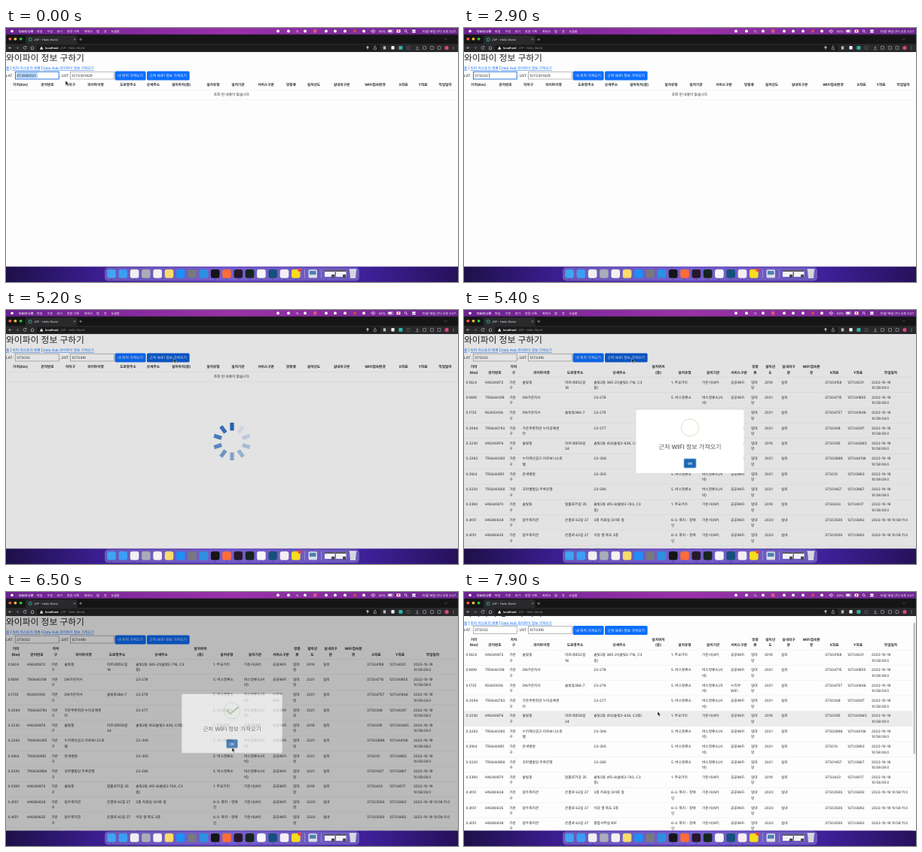
An HTML page for the animation above (8 s loop, 600 by 338 pixels).

```html
<!DOCTYPE html>
<html lang="ko">
<head>
<meta charset="utf-8">
<title>와이파이 정보 구하기</title>
<style>
html, body { margin: 0; width: 100%; height: 100%; overflow: hidden; background: #2a1460; }
svg { display: block; width: 100vw; height: 100vh; }
text { font-family: Inter, "Noto Sans CJK KR", "Noto Sans CJK", sans-serif; text-rendering: geometricPrecision; white-space: pre; }
</style>
</head>
<body>
<svg id="stage" viewBox="0 0 600 338" xmlns="http://www.w3.org/2000/svg"></svg>
<script>
const LOOP = 8000, STEP = 100;
const TOP = 32, BOTTOM = 317.6, ROW_H = 20.35, ROW_TOP = 89.6;
const INK = '#212529', BLUE = '#0d6efd';

// --- markup helpers ---
const rect = (x, y, w, h, fill, extra = '') =>
  `<rect x="${x}" y="${y}" width="${w}" height="${h}" fill="${fill}" ${extra}/>`;
const dot = (x, y, r, fill, extra = '') => `<circle cx="${x}" cy="${y}" r="${r}" fill="${fill}" ${extra}/>`;
const path = (d, stroke, w = 0.7, extra = '') =>
  `<path d="${d}" fill="none" stroke="${stroke}" stroke-width="${w}" ${extra}/>`;
const label = (x, y, s, size = 4.7, fill = INK, extra = '') =>
  `<text x="${x}" y="${y + size * 0.36}" font-size="${size}px" fill="${fill}" ${extra}>${s}</text>`;
const lines = (x, y, s, extra) =>
  s.split('|').map((part, i) => label(x, y + i * 7.5, part, 4.7, INK, extra)).join('');
const MID = 'text-anchor="middle"', BOLD = 'font-weight="600"';
const group = (id, body, extra = '') => `<g id="${id}" ${extra}>${body}</g>`;

// --- menu bar and browser frame ---
function menuBar() {
  const items = [[41, '파일'], [54.5, '수정'], [67.5, '보기'], [81, '방문 기록'], [104, '북마크'], [120, '탭'], [130, '창'], [139.5, '도움말']];
  const w = '#fff';
  let s = dot(8, 4.2, 1.8, w) + label(17, 4.2, '다도리 나루', 4, w, 'font-weight="700"');
  s += items.map(([x, t]) => label(x, 4.2, t, 4, w)).join('');
  s += [361, 375, 397, 425, 437, 450, 475].map(x => dot(x, 4.2, 1.9, w)).join('');
  s += label(384.5, 4.2, '7L', 4, w) + rect(408, 2, 4.4, 4.4, '#e0567c') + dot(463, 4.2, 1.9, '#e2484d');
  s += path('M485 3.4h1.2l1.6-1.4v4.4l-1.6-1.4H485zM489 2.6q1.4 1.6 0 3.2', w, 0.6);
  s += label(495, 4.2, '80%', 4, w);
  s += rect(507, 2.5, 6.6, 3.4, 'none', `rx=".8" stroke="${w}" stroke-width=".5"`) + rect(507.6, 3.1, 4.4, 2.2, w);
  s += rect(518.5, 2.3, 5, 3.8, w) + dot(521, 4.2, 1.1, '#d83a55');
  s += dot(530.5, 3.8, 1.4, 'none', `stroke="${w}" stroke-width=".6"`) + path('M531.5 4.9l1.5 1.5', w);
  s += rect(539, 2.3, 4.8, 1.6, w, 'rx=".8"') + rect(539, 4.6, 4.8, 1.6, w, 'rx=".8"');
  s += label(597, 4.2, '10월 19일 (수) 오후 3:27', 4.2, w, 'text-anchor="end"');
  return rect(0, 0, 600, 9, 'url(#menu)') + group('menuItems', s);
}

function browserFrame() {
  const g = '#b9b9bc';
  let s = rect(0, 8.6, 600, 13, '#151516') + rect(0, 21, 600, 11.2, '#29292b');
  s += dot(5.3, 14.6, 1.9, '#ff5f57') + dot(12.4, 14.6, 1.9, '#febc2e') + dot(19.6, 14.6, 1.9, '#28c840');
  s += rect(26, 10, 68.5, 12, '#29292b', 'rx="2"');
  s += dot(32.2, 15.4, 2, 'none', 'stroke="#35b8a0" stroke-width=".9"');
  s += label(37, 15.4, 'JSP - Hello World', 3.8, '#e4e4e6');
  s += path('M89.8 14l2.4 2.4m0-2.4l-2.4 2.4', g, 0.5) + path('M97.2 15.2h3.8m-1.9-1.9v3.8', g, 0.6);
  s += path('M582 13.8l1.8 1.8 1.8-1.8', '#77777a', 0.6);
  s += rect(41, 22.4, 456, 8.2, '#1a1a1b', 'rx="2"');
  s += `<path d="M44.8 28.4l2.3-4.2 2.3 4.2z" fill="#e8e8ea"/>`;
  s += label(52, 26.4, 'localhost', 4, '#fff', BOLD) + label(72, 26.4, 'JSP - Hello World', 3.9, '#8f8f93');

  let t = path('M7.4 26.4H3.6m1.8-1.8l-1.8 1.8 1.8 1.8', g) + path('M13 26.4h3.8m-1.8-1.8l1.8 1.8-1.8 1.8', '#707074');
  t += path('M26.6 25a2 2 0 1 0 .4 1.8M27 24v1.4h-1.4', g) + path('M32.8 26.2l2.2-2 2.2 2M33.5 26v2.4h3V26', g);
  t += dot(480, 25.6, 1.5, g) + path('M480 26.5v2.2', g, 0.9);
  t += path('M488.2 25.6v3h3.2v-3M489.8 27.2v-3.4m-1.1 1l1.1-1 1.1 1', g, 0.6);
  t += rect(500.8, 24.2, 3.4, 4.2, g, 'rx=".6"') + rect(511.4, 24, 4.2, 4.6, '#f1f1f3', 'rx=".8"');
  t += rect(521.4, 24, 5, 4.8, '#2bb8a8', 'rx=".8"');
  t += rect(532, 24.4, 4, 4, 'none', `rx="1" stroke="#77777a" stroke-width=".6"`);
  t += path('M546 24v3m-1.3-1.2l1.3 1.3 1.3-1.3M543.8 28.6h4.4', g, 0.6);
  t += [555.5, 565.5, 575].map(x => rect(x - 2, 24.4, 4, 4, 'none', `rx=".6" stroke="${g}" stroke-width=".6"`)).join('');
  t += dot(585, 26.4, 2.6, '#d6457f') + [24.8, 26.4, 28].map(y => dot(594, y, 0.5, g)).join('');
  return s + group('tools', t);
}

// --- page content ---
const field = (id, x) =>
  rect(x, 58.2, 57.6, 9.8, '#fff', `id="${id}Box" stroke="#767676" stroke-width=".5"`) +
  rect(x + 1.4, 59.3, 28, 7.6, '#b3d7ff', `id="${id}Sel"`) +
  label(x + 1.6, 63.1, '', 4.7, INK, `id="${id}"`) +
  rect(0, 59.8, 0.5, 6.6, '#111', `id="${id}Caret"`);

const link = (x, s) => label(x, 53.6, s, 4.7, BLUE, 'text-decoration="underline"');
const button = (id, x, w, s) =>
  rect(x, 57.4, w, 12.2, BLUE, `id="${id}" rx="1.7"`) + label(x + w / 2, 63.4, s, 4.8, '#fff', MID);
const rule = y => rect(0, y, 600, 0.35, '#dee2e6');

function pageHead() {
  return label(0, 40.2, '와이파이 정보 구하기', 11.8, INK, 'font-weight="500"') +
    link(0, '홈') + label(5.6, 53.6, '|') + link(8.5, '위치 히스토리 목록') + label(46.9, 53.6, '|') +
    link(49.2, 'Data Hub 와이파이 정보 가져오기') +
    label(0, 63, 'LAT :') + field('lat', 12.5) + label(71, 63, ', LNT :') + field('lnt', 85.6) +
    button('near', 144.6, 41, '내 위치 가져오기') + button('find', 187, 56.6, '근처 WIFI 정보 가져오기');
}

const HEADS = ['거리(Km)', '관리번호', '자치구', '와이파이명', '도로명주소', '상세주소', '설치위치(층)', '설치유형', '설치기관',
  '서비스구분', '망종류', '설치년도', '실내외구분', 'WIFI접속환경', 'X좌표', 'Y좌표', '작업일자'];
const WRAPPED = { 0: '거리|(Km)', 2: '자치|구', 6: '설치위치|(층)', 10: '망종|류', 11: '설치년|도', 12: '실내외구|분', 13: 'WIFI접속환|경' };

function emptyTable() {
  const xs = [19, 55, 85.5, 119, 162, 195.5, 232.5, 275, 308, 345, 378.5, 408.5, 445.5, 490, 527.5, 553.5, 583];
  return HEADS.map((h, i) => label(xs[i], 75.8, h, 4.7, INK, `${MID} font-weight="700"`)).join('') +
    rule(82) + label(300, 88.5, '조회 된 내용이 없습니다.', 4.7, INK, MID) + rule(95);
}

// kind: type, agency, year, indoor, date
const KINDS = {
  s: ['1. 주요거리', '가온시(AP)', '2019', '실외', '2022-10-19|10:58:09.0'],
  b: ['5. 버스정류소', '버스정류소(시|비)', '2021', '실외', '2022-10-19|10:58:08.0'],
  n: ['5. 버스정류소', '버스정류소(국|비)', '2021', '실외', '2022-10-19|10:58:04.0'],
  c: ['6-3. 복지 - 장애|인', '가온시(AP)', '2020', '실내', '2022-10-19 10:58:11.0']
};
// kind; distance; id; name; road; detail; x; y
const ROWS = `s;0.1624;HN340872;솔빛동;미르내로52길|18;솔빛2동 385-21(솔빛2-716, C3|층);37.504158;127.04021
b;0.1699;TRS640318;DN가온지사;;23-278;37.504715;127.041855
n;0.1735;RS400006;DN가온지사;솔빛동386-7;23-279;37.504757;127.041466
b;0.2094;TRS640793;가온푸른회관.누리공예센|터;;23-277;37.50308;127.04397
s;0.2230;HN340876;솔빛동;미르내로58길|24;솔빛2동 412(솔빛2-638, C3층);37.50395;127.043945
b;0.2263;TRS640265;누리재산금고.아르보니스호|텔;;23-306;37.502888;127.044136
b;0.3164;TRS640851;온새병원;;23-305;37.5013;127.03893
b;0.3230;TRS640856;꼬마별빌딩.두루은행;;23-280;37.501457;127.03867
s;0.3390;HN340870;솔빛동;달품로71길 35;솔빛2동 415-6(솔빛2-743, C3|층);37.50433;127.04517
c;0.4151;HN380634;담우복지관;은결로 62길 27;3층 치료실 301호 앞;37.503593;127.03692
c;0.4151;HN380635;담우복지관;은결로 62길 27;식당 옆 복도 3층;37.503593;127.03692
c;0.4151;HN380639;담우복지관;은결로 62길 27;종합사무실 B1F;37.503593;127.03692`.split('\n').map(r => r.split(';'));

function resultTable() {
  const hx = [13, 41, 66, 103, 147.5, 206, 258, 293, 330.5, 365, 386.5, 406.5, 431, 461, 491.5, 523, 566.5];
  const cx = [2.5, 28, 60.2, 77.5, 134, 172.3, 275, 316, 354, 381, 399, 421, 479, 509, 541];
  let s = rect(0, 0, 595.6, ROW_H, '#ececec', 'id="hover"');
  s += HEADS.map((h, i) => {
    const t = WRAPPED[i] || h;
    return lines(hx[i], t.includes('|') ? 75.6 : 83.1, t, `${MID} font-weight="700"`);
  }).join('') + rule(ROW_TOP - 0.3);
  ROWS.forEach(([kind, dist, id, name, road, detail, x, y], r) => {
    const [type, agency, year, side, date] = KINDS[kind];
    const service = kind === 'n' ? '누리부|WiFi' : '공공WiFi';
    const top = ROW_TOP + r * ROW_H;
    [dist, id, '가온|구', name, road, detail, type, agency, service, '임대|망', year, side, x, y, date]
      .forEach((t, i) => { if (t) s += lines(cx[i], top + 6.3, t); });
    s += rule(top + ROW_H - 0.3);
  });
  return s;
}

function spinner() {
  let s = '';
  for (let i = 0; i < 10; i++)
    s += rect(297.4, 150, 5.2, 10.4, '#2461ad', `class="spoke" transform="rotate(${i * 36} 300 175)"`);
  return s;
}

function dialog() {
  return rect(220, 128, 160, 94, '#fff', 'rx="1.7"') +
    dot(300, 154.4, 13, 'none', 'stroke="#cfe8c1" stroke-width="1.1"') +
    path('M292.6 155l4.7 4.7L309.8 149', '#93bf78', 1.8, 'id="check" pathLength="1" stroke-dasharray="1 2" stroke-linecap="round"') +
    label(300, 183.4, '근처 WIFI 정보 가져오기', 9, '#545454', `${MID} font-weight="500"`) +
    rect(290.4, 199.9, 19.2, 15, '#a9c9e8', 'rx="2"') + rect(291.4, 200.9, 17.2, 13, '#1d66b5', 'rx="1.3"') +
    label(300, 207.5, 'OK', 5, '#fff', `${MID} ${BOLD}`);
}

// --- dock ---
function dock() {
  const icons = ['#3fa4f2', '#3d9df5', '#f0f0f0', '#a9adb8', '#f4f1ee', '#f8dc6c', '#1f8ff5', '#77797f', '#2f8fe0',
    '#151517', '#ff6c37', '#26182b', '#16251f', '#f6f6f6', '#16507c', '#f5eff3', '#f9dc1c'];
  let s = rect(0, 316, 600, 22, 'url(#desk)') + rect(131, 318.6, 338, 17.8, '#8f86d8', 'rx="4.5" opacity=".55"');
  icons.forEach((c, i) => {
    const x = 140 + i * 15.3;
    s += rect(x - 5.8, 321.2, 11.6, 11.6, c, 'rx="2.8"');
    if ([0, 2, 9, 10, 11, 12, 13, 14, 15, 16].includes(i)) s += dot(x, 334.8, 0.5, '#1c1440');
  });
  s += dot(389.6, 322, 2.2, '#f0433a');
  s += rect(396.5, 321, 0.4, 12, '#d6d2f0') + rect(418, 321, 0.4, 12, '#d6d2f0');
  s += rect(401.5, 321.5, 11.5, 11, '#d9dfe8', 'rx="1.5"') + rect(403, 323.2, 8.5, 5, '#4f7fb0');
  s += [423, 438].map(x => rect(x, 322.5, 13.5, 8.6, '#f3f3f6') + rect(x, 322.5, 13.5, 1.6, '#39393d') + rect(x + 9, 328, 4.2, 4.2, '#4a4a52', 'rx="1"')).join('');
  return s + `<path d="M456 321.5h9l-1 11.4h-7z" fill="#d4d6de"/>` + rect(455.5, 320.8, 10, 1.3, '#eceef3', 'rx=".6"');
}

const stage = document.getElementById('stage');
stage.innerHTML = `<defs>
<linearGradient id="menu"><stop offset="0" stop-color="#6a2290"/><stop offset=".5" stop-color="#9a32a8"/><stop offset="1" stop-color="#6c2791"/></linearGradient>
<linearGradient id="desk"><stop offset="0" stop-color="#1d1048"/><stop offset=".2" stop-color="#3b1d8f"/><stop offset=".5" stop-color="#5530bd"/><stop offset=".8" stop-color="#3e2098"/><stop offset="1" stop-color="#26115a"/></linearGradient>
<clipPath id="view">${rect(0, TOP, 600, BOTTOM - TOP, '#fff')}</clipPath></defs>` +
  dock() + menuBar() + browserFrame() +
  `<g clip-path="url(#view)">` + rect(0, TOP, 600, 286, '#fdfdfd') +
  group('page', pageHead() + group('empty', emptyTable()) + group('results', resultTable())) +
  group('bar', rect(595.6, TOP, 4.4, 286, '#fafafa') + rect(596.5, 33, 2.6, 175, '#c1c1c1', 'id="thumb" rx="1.3"')) +
  group('shade', rect(0, TOP, 600, 286, '#000')) + group('spin', spinner()) + group('dialog', dialog()) + '</g>' +
  `<path id="cursor" d="M0 0v5.8l1.4-1.2 1 2.2 1-.4-1-2.2h1.8z" fill="#111" stroke="#fff" stroke-width=".45"/>`;

const el = {};
stage.querySelectorAll('[id]').forEach(n => { el[n.id] = n; });
const spokes = stage.querySelectorAll('.spoke');
const set = (id, attrs) => { for (const k in attrs) el[id].setAttribute(k, attrs[k]); };
const show = (id, on) => set(id, { visibility: on ? 'visible' : 'hidden' });
const ramp = (t, a, b) => Math.min(1, Math.max(0, (t - a) / (b - a)));
const ease = p => p * p * (3 - 2 * p);

// time, x, y of the pointer tip
const TRAIL = [[0, 79, 70], [300, 79, 70], [900, 604, 45], [2900, 604, 45], [3600, 111, 62], [3700, 111, 62],
  [3900, 150, 69.7], [4250, 152, 71], [4700, 222, 64], [5400, 222.5, 64.3], [5900, 328, 236], [6300, 300, 207],
  [6500, 300, 207], [7100, 97, 113], [7300, 99, 117], [7900, 257, 159]];

function pointer(t) {
  let i = 0;
  while (i < TRAIL.length - 2 && t >= TRAIL[i + 1][0]) i++;
  const [a, x, y] = TRAIL[i], [b, u, v] = TRAIL[i + 1];
  const p = ease(ramp(t, a, b));
  return [x + (u - x) * p, y + (v - y) * p];
}

function setField(id, value, focus, selected, caret) {
  el[id].textContent = value;
  set(id + 'Box', { stroke: focus ? '#1767d8' : '#767676', 'stroke-width': focus ? 0.9 : 0.5 });
  show(id + 'Sel', focus && selected);
  show(id + 'Caret', focus && !selected);
  set(id + 'Caret', { x: caret });
}

function draw(t) {
  const away = t >= 1000 && t < 2900;
  const [x, y] = pointer(t);
  const loaded = t >= 5400, open = loaded && t < 6600;
  const scroll = 12.5 * ease(ramp(t, 7300, 7900));

  set('menuItems', { opacity: away ? 0.42 : 1 });
  set('tools', { opacity: away ? 0.6 : 1 });
  set('cursor', { transform: `translate(${x} ${y})` });
  show('cursor', t < 900 || t >= 2900);

  setField('lat', t < 500 ? '37.2680521' : '37.5032', !away && t < 3600, t < 500, 33);
  const pasted = t >= 4300;
  setField('lnt', pasted ? '127.0416' : '127.0301429', t >= 3600 && t < 4800, t >= 4100 && !pasted, pasted ? 109.5 : 110.8);
  set('find', { fill: x > 187 && x < 243.6 && y > 57.4 && y < 69.6 ? '#0b5ed7' : BLUE });

  set('page', { transform: `translate(0 ${-scroll})` });
  show('empty', !loaded);
  show('results', loaded);
  show('bar', loaded && !open);
  set('thumb', { y: 33 + scroll * 0.61 });
  const row = Math.floor((y + scroll - ROW_TOP) / ROW_H);
  show('hover', loaded && !open && row >= 0 && row < ROWS.length);
  set('hover', { y: ROW_TOP + row * ROW_H });

  const waiting = t >= 4800 && !loaded;
  const closing = ramp(t, 6450, 6600);
  set('shade', { opacity: waiting ? 0.1 * ramp(t, 4700, 5000) : open ? 0.1 + 0.3 * ramp(t, 5400, 5500) - 0.4 * closing : 0 });
  show('spin', waiting);
  const lead = Math.floor((t - 5200) / 100) + 10;
  spokes.forEach((s, i) => {
    const lag = (lead - i + 20) % 10;
    s.setAttribute('opacity', 1 - lag * 0.1);
  });

  show('dialog', open);
  const p = ramp(t, 5300, 5700);
  const pop = p < 0.45 ? 0.7 + 0.35 * p / 0.45 : p < 0.8 ? 1.05 - 0.1 * (p - 0.45) / 0.35 : 0.95 + 0.05 * (p - 0.8) / 0.2;
  const k = pop * (1 - 0.5 * closing);
  set('dialog', { transform: `translate(300 175) scale(${k}) translate(-300 -175)`, opacity: 1 - closing });
  set('check', { 'stroke-dashoffset': 1 - ease(ramp(t, 5500, 5850)), opacity: t > 5500 ? 1 : 0 });
}

const start = performance.now();
function tick() {
  const t = (performance.now() - start) % LOOP;
  draw(Math.floor(t / STEP) * STEP);
  requestAnimationFrame(tick);
}
tick();
</script>
</body>
</html>
```
